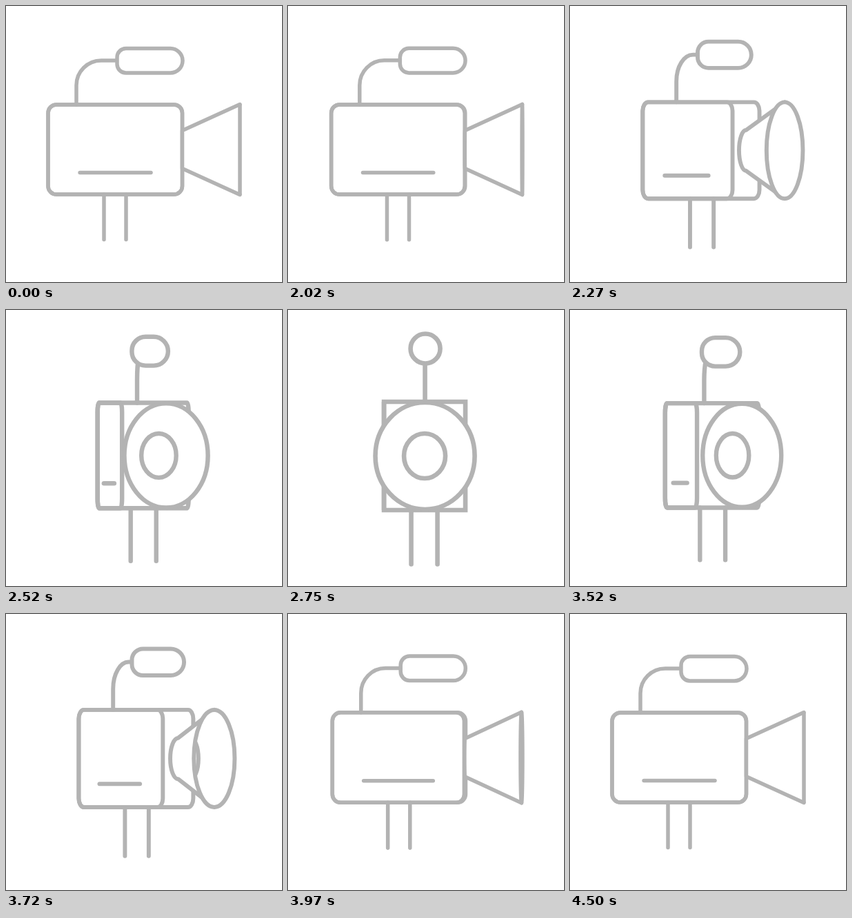
Write an HTML page with a canvas that moves like this. It is 400 px wide and 400 px high and loops after 4520 ms.

```html
<!DOCTYPE html>
<html>
<head>
<meta charset="utf-8">
<style>
  html, body { margin: 0; height: 100%; overflow: hidden; background: #fff; }
  canvas { display: block; }
</style>
</head>
<body>
<canvas width="400" height="400"></canvas>
<script>
const ctx = document.querySelector('canvas').getContext('2d');
const LOOP = 4520;

// [time, value] keys: turn is 0 in side view and 1 in front view
const TURN = [[1990, 0], [2720, 1], [3285, 1], [4030, 0]];
const SWAY = [[1990, 0], [2190, 19], [2770, -2], [3100, 0], [3600, 17], [4170, -4], [4500, 0]];

function valueAt(keys, t) {
  if (t <= keys[0][0]) return keys[0][1];
  for (let i = 1; i < keys.length; i++) {
    const [t0, a] = keys[i - 1], [t1, b] = keys[i];
    if (t < t1) {
      const x = (t - t0) / (t1 - t0);
      return a + (b - a) * x * x * (3 - 2 * x);
    }
  }
  return keys[keys.length - 1][1];
}

function shape(build, filled) {
  ctx.beginPath();
  build();
  if (filled) ctx.fill();
  ctx.stroke();
}

function line(x0, y0, x1, y1) {
  shape(() => { ctx.moveTo(x0, y0); ctx.lineTo(x1, y1); });
}

function box(l, t, r, b, radii, filled) {
  shape(() => ctx.roundRect(l, t, r - l, b - t, radii), filled);
}

function draw(time) {
  const t = time % LOOP;
  const p = valueAt(TURN, t);
  const bulge = p * (1 - p);
  const size = p + 0.16 * bulge; // growth runs slightly ahead of the turn
  const mix = (side, front) => side + (front - side) * p;
  const grow = (side, front) => side + (front - side) * size;

  ctx.setTransform(1, 0, 0, 1, 0, 0);
  ctx.fillStyle = '#fff';
  ctx.fillRect(0, 0, 400, 400);
  ctx.translate(valueAt(SWAY, t), 0);
  ctx.strokeStyle = '#b3b3b3';
  ctx.lineWidth = grow(5.5, 6.6);
  ctx.lineCap = 'round';

  const left = mix(61, 141), seam = mix(255.5, 141), right = mix(255.5, 259);
  const top = grow(143, 133), bottom = grow(273, 290);
  const midY = grow(208, 211.5);

  // Cable and microphone
  const cableX = mix(102, 200.5) + 8 * bulge, bendX = mix(36, 0);
  const bendY = grow(115, 99), micY = grow(79, 56);
  shape(() => {
    ctx.moveTo(cableX, top);
    ctx.lineTo(cableX, bendY);
    ctx.ellipse(cableX + bendX, bendY, bendX, bendY - micY, 0, Math.PI, Math.PI * 1.5);
    ctx.lineTo(mix(161, 200.5), micY);
  });
  const micLeft = mix(13, 21.5), micRight = grow(18, 21.5);
  box(mix(161, 179.5), grow(61.5, 34.5), mix(256, 222.5), grow(97, 77.5),
    [micLeft, micRight, micRight, micLeft], true);

  // Legs
  for (const x of [grow(142, 180.5), grow(174, 218.5)]) line(x, bottom, x, grow(338.5, 368.5));

  // Body with its side face
  const corner = { x: mix(12, 0), y: grow(12, 14) };
  box(left, top, right, bottom, corner);
  box(left, top, seam, bottom, corner);
  const width = seam - left, slotY = grow(241.5, 253);
  if (width > 1) {
    line(left + width * 0.237 + 5 * bulge, slotY, left + width * 0.766 - 20 * bulge, slotY);
  }

  // Lens hood: cone, mouth, inner ring
  const mouthX = mix(339, 200.5), mouthRx = grow(0, 72), mouthRy = grow(65.5, 77.5);
  const backX = mix(255.5, 200.5), backRy = grow(27.5, 33);
  ctx.lineJoin = 'round';
  shape(() => {
    ctx.moveTo(mouthX, midY - mouthRy);
    ctx.ellipse(backX, midY, grow(0, 28), backRy, 0, Math.PI * 1.5, Math.PI / 2, true);
    ctx.lineTo(mouthX, midY + mouthRy);
  }, true);
  ctx.lineJoin = 'miter';

  const mouth = () => ctx.ellipse(mouthX, midY, mouthRx, mouthRy, 0, 0, Math.PI * 2);
  shape(mouth, true);
  ctx.save();
  ctx.beginPath();
  mouth();
  ctx.clip();
  shape(() => ctx.ellipse(mix(283, 200), midY, grow(0, 30), grow(29, 32.5), 0, 0, Math.PI * 2));
  ctx.restore();
}

const start = performance.now();
(function frame() {
  draw(performance.now() - start);
  requestAnimationFrame(frame);
})();
</script>
</body>
</html>
```
